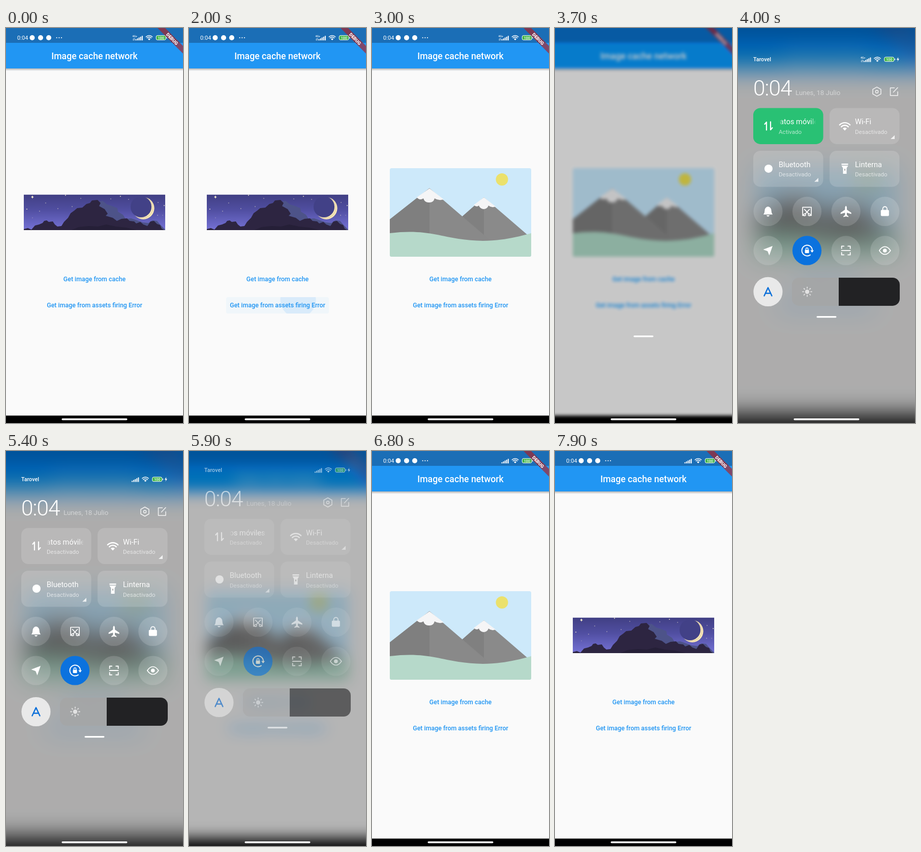
An HTML page for the animation above (8000 ms loop, 348 by 772 pixels).

```html
<!DOCTYPE html>
<html lang="en">
<head>
<meta charset="utf-8">
<title>Image cache network</title>
<style>
  html, body { margin: 0; width: 100%; height: 100%; overflow: hidden; background: #000; }
  svg { display: block; width: 348px; height: 772px; overflow: hidden; font-family: Roboto, "Noto Sans", sans-serif; }
</style>
</head>
<body>
<svg id="stage" viewBox="0 0 348 772" xmlns="http://www.w3.org/2000/svg"></svg>
<script>
const LOOP = 8000, STEP = 100;
const OPEN_AT = 3700, TOGGLE_AT = 5000, CLOSE_AT = 5700, CLOSED_AT = 6200;
const PRESS_ASSETS = 2000, PRESS_CACHE = 7000, SWAP_DELAY = 150, RIPPLE_TIME = 400;

const clamp = v => Math.max(0, Math.min(1, v));
const mix = (a, b, k) => a + (b - a) * k;

// Markup helpers
const rect = (x, y, w, h, fill, rest = '') =>
  `<rect x="${x}" y="${y}" width="${w}" height="${h}" fill="${fill}" ${rest}/>`;
const circle = (x, y, r, fill, rest = '') => `<circle cx="${x}" cy="${y}" r="${r}" fill="${fill}" ${rest}/>`;
const path = (d, fill, rest = '') => `<path d="${d}" fill="${fill}" ${rest}/>`;
const line = (d, width = 1.6, color = '#fff') =>
  path(d, 'none', `stroke="${color}" stroke-width="${width}" stroke-linecap="round" stroke-linejoin="round"`);
const text = (x, y, size, str, rest = '') => `<text x="${x}" y="${y}" font-size="${size}" ${rest}>${str}</text>`;
const at = (x, y, body, rest = '') => `<g transform="translate(${x} ${y})" ${rest}>${body}</g>`;
const gradient = (id, coords, stops) =>
  `<linearGradient id="${id}" gradientUnits="userSpaceOnUse" ${coords}>` +
  stops.map(([o, c, a = 1]) => `<stop offset="${o}" stop-color="${c}" stop-opacity="${a}"/>`).join('') +
  '</linearGradient>';

const wifi = s => `<g transform="scale(${s})">` +
  line('M-7 -1.5A10 10 0 0 1 7 -1.5M-4.7 1.2A6.6 6.6 0 0 1 4.7 1.2', 1.7) +
  path('M-2.8 3.3A4 4 0 0 1 2.8 3.3L0 6.2Z', '#fff') + '</g>';

function statusIcons(cls) {
  const bars = [0, 1, 2, 3, 4].map(i => rect(i * 3.1, 3 - i * 1.7, 2, 2.2 + i * 1.7, '#fff', 'rx=".5"')).join('');
  const mobile = text(-6, -1.5, 5.2, '4G+', 'fill="#fff" font-weight="500"') +
    line('M-4 1.4V5M-5 4L-4 5M-1.8 5V1.4M-.8 2.4L-1.8 1.4', .7);
  return `<g class="${cls}">${mobile}</g>` + bars + at(27, -.5, wifi(.88)) +
    rect(40.7, -4.3, 19, 8.6, '#43b649', 'rx="2.6" stroke="#fff" stroke-width="1"') +
    rect(60.8, -1.5, 1.3, 3, '#fff', 'rx=".6"') +
    text(50.2, 2.7, 7.4, '100', 'fill="#fff" font-weight="500" text-anchor="middle"') +
    path('M68.3 -4.5L64.8 .7H67.2L66.4 4.5L70 -.9H67.6Z', '#fff');
}

function nightImage() {
  const stars = [[41, 354], [78, 342], [102, 353], [117, 327], [147, 333], [206, 334], [225, 329], [241, 335],
    [299, 341], [311, 347], [298, 366], [52, 371], [66, 358], [308, 366], [214, 352], [130, 349]];
  return `<g clip-path="url(#nightClip)">` + rect(35, 325.5, 278, 69.5, 'url(#nightSky)') +
    stars.map(([x, y], i) => circle(x, y, i % 3 ? .65 : .9, '#f5ecd0', `opacity="${i < 11 ? .95 : .5}"`)).join('') +
    path('M52 327Q52.3 330 55 330.4Q52.3 330.8 52 334Q51.6 330.8 49 330.4Q51.6 330 52 327Z', '#fff5d0') +
    circle(270, 352.3, 21.6, '#fce9b5') + circle(265.5, 349.5, 20.6, '#424187') +
    circle(268, 351, 20.6, 'none', 'stroke="#424187" stroke-width=".6" opacity=".4"') +
    path('M174 342L181 339 190 338 199 345 209 348 219 352 220 359 230 365 235 373 246 372 258 376 269 380 280 381 ' +
      '288 376 297 377 303 384 308 389 313 394V396H174Z', '#4d5389') +
    path('M35 393L43 391 50 394 57 386 65 384 72 381 75 377 80 376 84 379 92 378 96 384 101 388 109 387 114 379 ' +
      '122 371 127 362 134 357 140 352 150 351 158 344 165 342 169 337 180 336 186 342 183 348 194 354 200 363 196 367 ' +
      '210 371 218 377 227 373 238 372 243 377 252 378 256 382 264 379 270 384 278 387 284 378 291 377 297 383 ' +
      '303 385 306 392 313 396H35Z', '#2d2541') +
    path('M126 396L143 389 163 387 181 388 197 384 216 388 236 390 262 396Z', '#251f37') + '</g>';
}

function dayImage() {
  return `<g clip-path="url(#dayClip)">` + rect(35, 274, 278, 173, '#cde9fa') + circle(255.5, 296, 12, '#ebe16c') +
    path('M220 331L130 410V430H310V408Z', '#8a8a8a') + path('M220 331L130 410V430H220Z', '#808080') +
    path('M113 313L30 378V430H250Z', '#898989') + path('M113 313L30 378V430H113Z', '#7f7f7f') +
    path('M113 313.5L88 331Q94 338 101 333Q104 342 113 341Q121 341 123 333Q131 338 141 335Z', '#f5f5f6') +
    path('M220 331L200 346Q206 351 210 347Q213 354 220 354Q227 353 229 347Q235 352 243 349Z', '#f5f5f6') +
    path('M35 401C100 393 130 406 170 412S250 419 313 401V447H35Z', '#b6d9ca') + '</g>';
}

const ripple = (id, x, y, w, cx, cy) =>
  `<clipPath id="${id}Clip">${rect(x, y, w, 32, '#000', 'rx="3.5"')}</clipPath>` +
  `<g id="${id}" clip-path="url(#${id}Clip)">` + rect(x, y, w, 32, '#2196f3', 'opacity=".045"') +
  circle(cx, cy, 35, '#2196f3', 'opacity=".11"') + '</g>';

function appScreen() {
  const button = (y, label) =>
    text(174, y, 12.4, label, 'fill="#2196f3" font-weight="500" text-anchor="middle"');
  return rect(-120, -120, 588, 900, '#fafafa') + rect(-120, 79, 588, 5, 'url(#barShadow)') +
    rect(-120, 28, 588, 51, '#2196f3') + rect(-120, -120, 588, 149, '#1b6eb6') +
    text(174, 61.2, 17.7, 'Image cache network', 'fill="#fff" font-weight="500" text-anchor="middle"') +
    `<g id="night">${nightImage()}</g><g id="day">${dayImage()}</g>` +
    ripple('cacheRipple', 105, 475, 138, 174, 488) + ripple('assetsRipple', 73, 526, 202, 214.5, 531) +
    button(495.2, 'Get image from cache') + button(546.2, 'Get image from assets firing Error') +
    rect(-120, 757.5, 588, 140, '#000') +
    '<g id="appStatus">' + text(22, 23, 11.2, '0:04', 'fill="#fff"') +
    [51.5, 68, 84].map(x => circle(x, 19, 5, '#fff')).join('') +
    [99.7, 104.4, 109.1].map(x => circle(x, 19, 1.1, '#fff')).join('') +
    at(254.5, 19, statusIcons('mobile')) + '</g>' +
    '<g transform="translate(348 0) rotate(45)">' + rect(-60, 24.8, 120, 10.6, '#b71c1c', 'opacity=".63"') +
    text(0, 33.3, 9, 'DEBUG', 'fill="#fff" font-weight="900" text-anchor="middle"') + '</g>';
}

const icons = {
  data: line('M-4 8V-7.5L-7.5 -3.5M4 -8V7.5L7.5 3.5', 2.2),
  wifi: wifi(1.45),
  mark: circle(0, 0, 8, '#fff'),
  torch: path('M-6.5 -10H6.5V-7.5H-6.5ZM-6.5 -6H6.5L3.5 -1V10H-3.5V-1Z', '#fff') +
    rect(-1, 0, 2, 4, '#aaa', 'rx="1"'),
  bell: path('M-9 6Q-6.5 3 -6.5 -2Q-6 -8.5 0 -9.5Q6 -8.5 6.5 -2Q6.5 3 9 6ZM-3 7.5H3Q2 10 0 10T-3 7.5Z', '#fff'),
  cut: line('M-5 8H-8.5V-8H8.5V8H5M-5 -4L3.5 5M5 -4L-3.5 5', 1.7) +
    circle(-4.5, 6.5, 2, 'none', 'stroke="#fff" stroke-width="1.5"') +
    circle(4.5, 6.5, 2, 'none', 'stroke="#fff" stroke-width="1.5"'),
  plane: path('M0 -11Q1.8 -10 1.8 -7V-3.5L10.5 2.5V5L1.8 2.5V7L5 9.5V11L0 9.8L-5 11V9.5L-1.8 7V2.5L-10.5 5V2.5' +
    'L-1.8 -3.5V-7Q-1.8 -10 0 -11Z', '#fff'),
  lock: rect(-8, -3, 16, 12, '#fff', 'rx="2"') + line('M-4.2 -3V-5A4.2 4.2 0 0 1 4.2 -5V-3', 1.8),
  compass: path('M9 -9L2.5 9.5L-.8 1.2L-9.5 -2Z', '#fff'),
  rotate: line('M6.5 -8.5A10.5 10.5 0 1 0 6.5 8.5M10.4 -1A10.5 10.5 0 0 0 6.5 -8.5', 1.9) +
    path('M6.5 -.5H13.5L10.2 4Z', '#fff') +
    rect(-4, -1.5, 8, 6.5, '#fff', 'rx="1"') + line('M-2.2 -1.5V-3A2.2 2.2 0 0 1 2.2 -3V-1.5', 1.4),
  scan: line('M-8.5 -4V-8.5H-4M4 -8.5H8.5V-4M8.5 4V8.5H4M-4 8.5H-8.5V4M-8.5 0H8.5', 1.8),
  eye: line('M-11 0Q-6 -7.5 0 -7.5T11 0Q6 7.5 0 7.5T-11 0Z', 1.7) + circle(0, 0, 3.8, '#fff'),
  sun: circle(0, 0, 4.2, '#e2e2e2') + [0, 45, 90, 135, 180, 225, 270, 315].map(a =>
    `<path d="M0 -7V-9" stroke="#e2e2e2" stroke-width="1.8" stroke-linecap="round" transform="rotate(${a})"/>`).join('')
};

function controlPanel() {
  const soft = 'fill-opacity=".15"';
  const title = (x, y, s) => text(x, y, 14.6, s, 'fill="#fff"');
  const state = (x, y, s, rest = '') => text(x, y, 11.6, s, `fill="#fff" fill-opacity=".65" ${rest}`);
  const tile = (x, y, icon, label, corner) => rect(x, y, 137.5, 70.5, '#fff', `rx="14" ${soft}`) +
    at(x + 30, y + 35, icons[icon]) +
    (label ? title(x + 50, y + 32, label) + state(x + 50, y + 50.5, 'Desactivado') : '') +
    (corner ? path(`M${x + 128} ${y + 53}V${y + 60.5}H${x + 120}Z`, '#fff', 'opacity=".8"') : '');
  const dials = ['bell', 'cut', 'plane', 'lock', 'compass', 'rotate', 'scan', 'eye'].map((name, i) => {
    const active = name === 'rotate';
    return at(59 + i % 4 * 76.6, i < 4 ? 352.5 : 429,
      circle(0, 0, 28.6, active ? '#0b72de' : '#fff', active ? '' : soft) + icons[name]);
  }).join('');
  return text(30, 59, 10.8, 'Tarovel', 'fill="#fff" font-weight="500"') + at(247, 55.3, statusIcons('mobile')) +
    text(30, 126, 42.5, '0:04', 'fill="#fff" font-weight="300" letter-spacing="-1"') +
    text(113, 125.3, 13.3, 'Lunes, 18 Julio', 'fill="#fff" fill-opacity=".5"') +
    at(273, 118.5, line('M0 -9L8 -4.5V4.5L0 9L-8 4.5V-4.5Z', 1.5) +
      circle(0, 0, 2.6, 'none', 'stroke="#fff" stroke-width="1.5"'), 'opacity=".85"') +
    at(306.5, 118.5, line('M1 -7.5H-7V7.5H7.5V0M-1 1L7.5 -8', 1.5), 'opacity=".85"') +
    `<g id="dataOn">${rect(30, 150.5, 137.5, 70.5, '#04b65c', 'rx="14"')}</g>` +
    tile(30, 150.5, 'data') + tile(180, 150.5, 'wifi', 'Wi-Fi', true) +
    tile(30, 234, 'mark', 'Bluetooth', true) + tile(180, 234, 'torch', 'Linterna') +
    `<g mask="url(#labelMask)"><g id="marquee">${title(80, 182.5, 'Datos móviles') + title(196, 182.5, 'Datos móviles')}</g></g>` +
    state(80, 201, 'Activado', 'id="dataState"') + dials +
    circle(59, 509.5, 28.6, '#e9e9e9') + line('M51.5 517.5L59 501.5L66.5 517.5M54.5 512.5H63.5', 2.4, '#0b6fd9') +
    `<g clip-path="url(#sliderClip)">${rect(106, 482, 92, 55, '#a6a6a6', 'opacity=".8"') +
      rect(198, 482, 120, 55, '#222224')}</g>` + at(136, 509.5, icons.sun);
}

const stage = document.getElementById('stage');
stage.innerHTML = '<defs>' +
  gradient('nightSky', 'x1="0" y1="325" x2="0" y2="395"', [[0, '#403f83'], [.45, '#514fa2'], [1, '#7572d6']]) +
  gradient('barShadow', 'x1="0" y1="79" x2="0" y2="84"', [[0, '#000', .28], [1, '#000', 0]]) +
  gradient('labelFade', 'x1="80" y1="0" x2="153" y2="0"', [[0, '#000'], [.12, '#fff'], [.86, '#fff'], [1, '#000']]) +
  `<mask id="labelMask" maskUnits="userSpaceOnUse" x="80" y="160" width="73" height="40">${
    rect(80, 160, 73, 40, 'url(#labelFade)')}</mask>` +
  `<clipPath id="nightClip">${rect(35, 325.5, 278, 69.5, '#000')}</clipPath>` +
  `<clipPath id="dayClip">${rect(35, 274, 278, 173, '#000', 'rx="3.5"')}</clipPath>` +
  `<clipPath id="sliderClip">${rect(106, 482, 212, 55, '#000', 'rx="14"')}</clipPath></defs>` +
  `<g id="app">${appScreen()}</g>` +
  `<g id="shade"><g id="panel">${controlPanel()}</g>${rect(154.5, 557, 39, 3.2, '#fff', 'id="handle" rx="1.6"')}</g>` +
  rect(109.5, 763, 129, 3.6, '#fff', 'rx="1.8"');

const el = id => document.getElementById(id);
const show = (node, visible) => { node.style.display = visible ? '' : 'none'; };

function setRipple(id, elapsed) {
  const node = el(id), active = elapsed >= 0 && elapsed < RIPPLE_TIME;
  show(node, active);
  if (!active) return;
  node.setAttribute('opacity', 1 - elapsed / RIPPLE_TIME);
  node.querySelector('circle').setAttribute('r', 35 + elapsed * .35);
}

function setShade(t) {
  const open = t >= OPEN_AT && t < CLOSED_AT, closing = t >= CLOSE_AT;
  const left = clamp((CLOSED_AT - t) / (CLOSED_AT - CLOSE_AT));
  const depth = closing ? left : clamp((t - OPEN_AT + 50) / 350);
  show(el('shade'), open);
  show(el('appStatus'), !open);
  const dim = depth ** .22;
  el('app').style.filter = open
    ? `blur(${24 * depth}px) saturate(${mix(1, 1.4, dim)}) brightness(${mix(1, .69, dim)})` : 'none';
  if (!open) return;
  const drop = closing ? -45 * (1 - left) : 44 * Math.exp((OPEN_AT - t) / 150);
  el('shade').setAttribute('transform', `translate(0 ${drop})`);
  el('panel').setAttribute('opacity', closing ? left : clamp((t - OPEN_AT) / 250));
  el('handle').setAttribute('opacity', closing ? left : 1);

  const toggled = t >= TOGGLE_AT;
  const scroll = (t - (toggled ? TOGGLE_AT : OPEN_AT)) * .025;
  el('marquee').setAttribute('transform', `translate(${-scroll} 0)`);
  el('dataOn').setAttribute('opacity', clamp(1 - (t - TOGGLE_AT + 100) / 200));
  el('dataState').textContent = toggled ? 'Desactivado' : 'Activado';
}

function render(t) {
  const day = t >= PRESS_ASSETS + SWAP_DELAY && t < PRESS_CACHE + SWAP_DELAY;
  show(el('day'), day);
  show(el('night'), !day);
  setRipple('assetsRipple', t - PRESS_ASSETS);
  setRipple('cacheRipple', t - PRESS_CACHE);
  document.querySelectorAll('.mobile').forEach(node => show(node, t < TOGGLE_AT));
  setShade(t);
}

const start = performance.now();
function tick() {
  const elapsed = (performance.now() - start) % LOOP;
  render(Math.floor(elapsed / STEP) * STEP);
  requestAnimationFrame(tick);
}
render(0);
requestAnimationFrame(tick);
</script>
</body>
</html>
```
